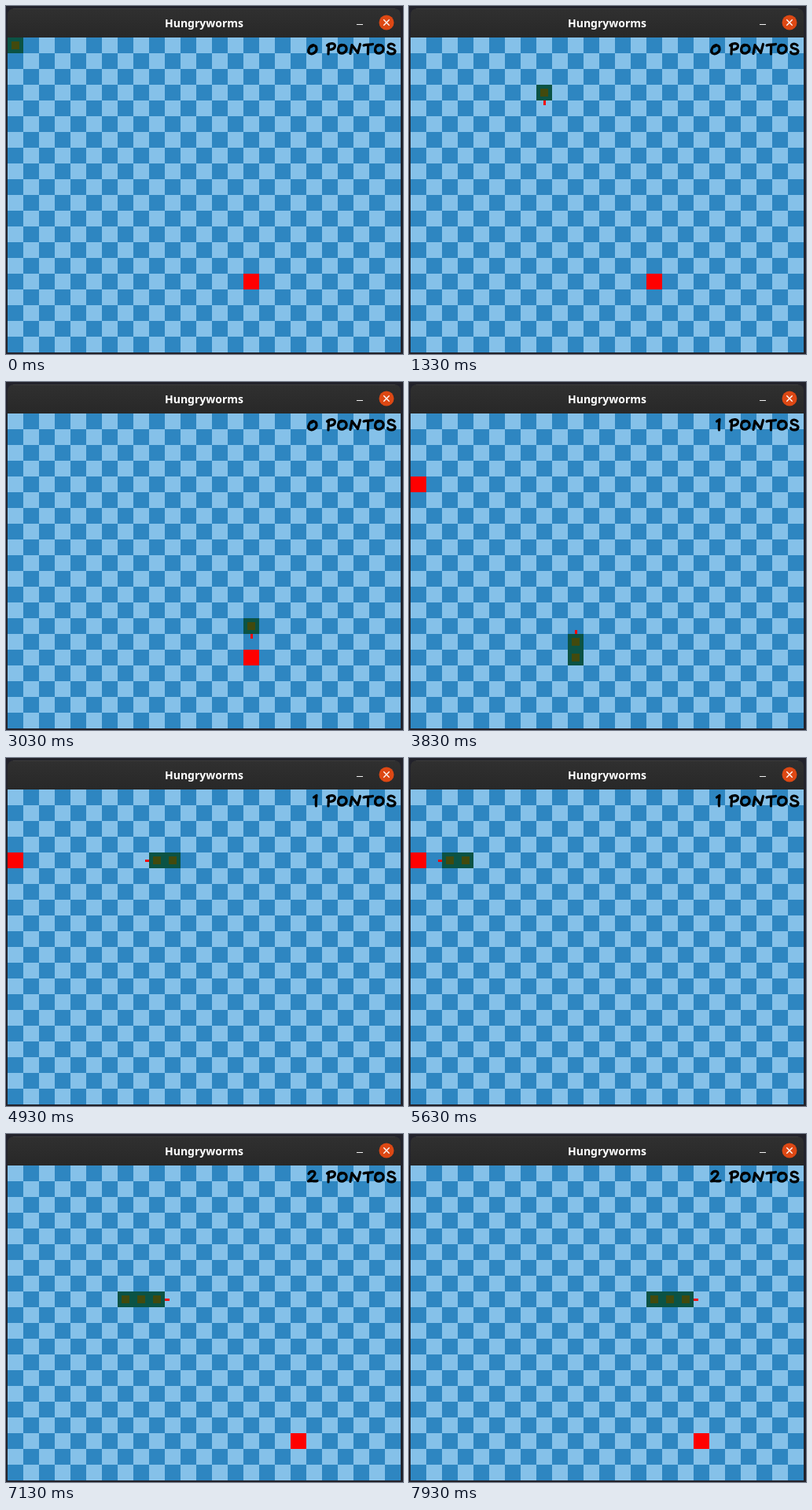
These frames come from a looping animation (505 by 442 pixels, 8 s). An HTML page with a canvas:

```html
<!DOCTYPE html>
<html lang="pt">
<head>
<meta charset="utf-8">
<title>Hungryworms</title>
<style>
html, body { margin: 0; width: 100%; height: 100%; overflow: hidden; background: #22222b; }
canvas { display: block; width: 505px; height: 442px; }
</style>
</head>
<body>
<canvas id="stage" width="505" height="442" role="img" aria-label="Hungryworms"></canvas>
<script>
const canvas = document.getElementById('stage');
const ctx = canvas.getContext('2d');

const LOOP = 8000, FIRST_STEP = 330, STEP = 100;
const CELL = 20, COLS = 25, ROWS = 20, LEFT = 2, TOP = 40;

const DIRS = { R: [1, 0], L: [-1, 0], D: [0, 1], U: [0, -1] };
const ROUTE = 'R8 D9 R7 D6 L5 U11 L10 D4 R17';
const FOODS = [[15, 15], [0, 4], [18, 17]];

// One entry per step: cell, heading and points scored so far.
const path = [{ x: 0, y: 0, dir: null, score: 0 }];
for (const leg of ROUTE.split(' ')) {
  const dir = DIRS[leg[0]];
  for (let i = 0; i < +leg.slice(1); i++) {
    const last = path[path.length - 1];
    const x = last.x + dir[0], y = last.y + dir[1];
    const [fx, fy] = FOODS[last.score];
    path.push({ x, y, dir, score: last.score + (x === fx && y === fy ? 1 : 0) });
  }
}

// Brush lettering for the score, drawn as strokes.
const DIGITS = [
  'M391 49.5C386 50 383 57 386 60C390 62.5 396 58 395 53.5C394.5 50 391 49 388.5 51.5',
  'M391.5 50L395 47.5C394.5 52 394 57 394.5 61',
  'M385 50.5C387 46.5 393 46.5 393 50C393 54 388 56 384.5 60C388 58.5 392 61 396 59.5'
].map(d => new Path2D(d));
const LABEL = new Path2D([
  'M410.5 50L410 61M408.5 50C412 46.5 419 47 418.5 51C418 54.5 414 55.5 410.5 55.5',
  'M428 49.5C422.5 49 421 57 424.5 59.5C428.5 61.5 434 58 433 53C432.3 50 428.5 48.5 426 50.5',
  'M438 60.5L440 49.5L447.5 59.5L450.5 48.5',
  'M455 50C458 48.5 463 49.5 466.5 48.5M460.5 50C461 54 460 58 460.5 61',
  'M475 49.5C469.5 49 468 57 471.5 59.5C475.5 61.5 481 58 480 53C479.3 50 475.5 48.5 473 50.5',
  'M494 50C491 46.5 485 48 486.5 52C488 55 495 53.5 495 57.5C494.5 62 486.5 61.5 485.5 58.5'
].join(''));

function rect(color, x, y, w, h) {
  ctx.fillStyle = color;
  ctx.fillRect(x, y, w, h);
}

function line(width, x1, y1, x2, y2) {
  ctx.lineWidth = width;
  ctx.beginPath();
  ctx.moveTo(x1, y1);
  ctx.lineTo(x2, y2);
  ctx.stroke();
}

function drawWindow() {
  rect('#22222b', 0, 0, 505, 442);
  const bar = ctx.createLinearGradient(0, 3, 0, 40);
  bar.addColorStop(0, '#303030');
  bar.addColorStop(1, '#282828');
  ctx.fillStyle = bar;
  ctx.beginPath();
  ctx.moveTo(2, 40);
  ctx.lineTo(2, 11);
  ctx.arcTo(2, 3, 10, 3, 8);
  ctx.lineTo(494, 3);
  ctx.arcTo(502, 3, 502, 11, 8);
  ctx.lineTo(502, 40);
  ctx.fill();
  rect('#3c3c3c', 9, 3, 486, 1);

  ctx.fillStyle = '#fff';
  ctx.font = 'bold 14px "Noto Sans", "Open Sans", sans-serif';
  ctx.textAlign = 'center';
  ctx.fillText('Hungryworms', 252, 27);

  rect('#f2f2f2', 446, 23, 8, 1);
  ctx.fillStyle = '#dd4814';
  ctx.beginPath();
  ctx.arc(484, 21, 9.5, 0, 2 * Math.PI);
  ctx.fill();
  ctx.strokeStyle = '#fff';
  ctx.lineCap = 'butt';
  line(1.3, 480.3, 17.3, 487.7, 24.7);
  line(1.3, 487.7, 17.3, 480.3, 24.7);
}

function drawBoard() {
  for (let y = 0; y < ROWS; y++) {
    for (let x = 0; x < COLS; x++) {
      const color = (x + y) % 2 ? '#2e86c1' : '#85c1e9';
      rect(color, LEFT + x * CELL, TOP + y * CELL, CELL, CELL);
    }
  }
}

function drawTongue({ x, y, dir }) {
  if (!dir) return;
  const cx = LEFT + x * CELL + 10, cy = TOP + y * CELL + 10;
  const ex = cx + dir[0] * 15, ey = cy + dir[1] * 15;
  if (dir[0]) rect('#f00', Math.min(cx, ex), cy - 1, 16, 3);
  else rect('#f00', cx - 1, Math.min(cy, ey), 3, 16);
}

function drawSnake(step) {
  const head = path[step];
  drawTongue(head);
  for (let i = 0; i <= head.score; i++) {
    const part = path[step - i];
    const x = LEFT + part.x * CELL, y = TOP + part.y * CELL;
    rect('#0b5345', x, y, CELL, CELL);
    rect('#424a0d', x + 5, y + 5, 10, 10);
  }
}

function drawScore(score) {
  ctx.strokeStyle = '#000';
  ctx.lineWidth = 3.2;
  ctx.lineCap = ctx.lineJoin = 'round';
  ctx.stroke(DIGITS[score]);
  ctx.stroke(LABEL);
}

function draw(time) {
  const t = time % LOOP;
  const step = t < FIRST_STEP ? 0 : Math.floor((t - FIRST_STEP) / STEP) + 1;
  const { score } = path[step];
  const [fx, fy] = FOODS[score];

  drawWindow();
  ctx.save();
  ctx.beginPath();
  ctx.rect(LEFT, TOP, COLS * CELL, ROWS * CELL);
  ctx.clip();
  drawBoard();
  rect('#f00', LEFT + fx * CELL, TOP + fy * CELL, CELL, CELL);
  drawSnake(step);
  drawScore(score);
  ctx.restore();
}

const start = performance.now();
function tick() {
  draw(performance.now() - start);
  requestAnimationFrame(tick);
}
tick();
</script>
</body>
</html>
```
